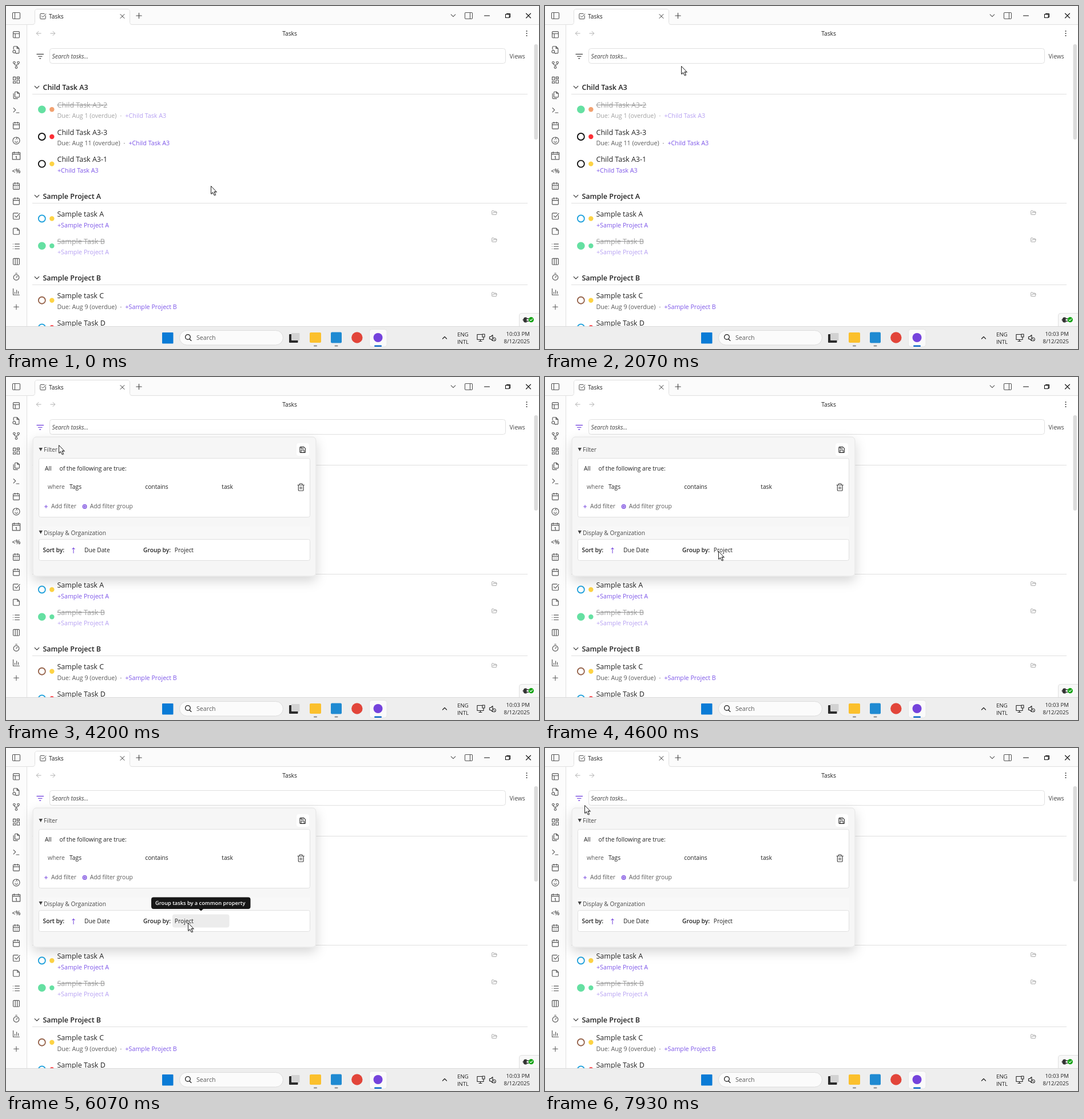
Write an HTML page that moves like this. It is 932x601 px and loops after 8000 ms.

```html
<!DOCTYPE html>
<html lang="en">
<head>
<meta charset="utf-8">
<title>Tasks</title>
<style>
html, body { margin: 0; width: 100%; height: 100%; overflow: hidden; background: #fff; }
svg { display: block; font-family: "Open Sans", "Noto Sans", sans-serif; }
text { white-space: pre; fill: #222; }
.name { font-size: 12.5px; }
.head { font-size: 12.5px; font-weight: 600; }
.meta { font-size: 10.7px; fill: #5c5c5c; }
.link { font-size: 10.7px; fill: #7c55e8; }
.ui { font-size: 10.25px; }
.muted { fill: #5c5c5c; }
.label { fill: #484848; font-weight: 500; }
.semi { font-weight: 600; }
.tip { font-size: 9.25px; font-weight: 600; fill: #fff; }
.tray { font-size: 9.6px; }
.icon { fill: none; stroke: #555; stroke-width: 2; stroke-linecap: round; stroke-linejoin: round; }
.done { opacity: .56; }
.done .name { text-decoration: line-through; fill: #555; }
.line { fill: none; stroke: #e0e0e0; }
</style>
</head>
<body>
<svg id="stage" width="932" height="601" viewBox="0 0 932 601">
  <defs>
    <clipPath id="page"><rect width="932" height="561"/></clipPath>
    <filter id="soft" x="-10%" y="-20%" width="120%" height="150%">
      <feDropShadow dx="0" dy="8" stdDeviation="10" flood-opacity=".16"/>
    </filter>
    <filter id="pointerShade" x="-50%" y="-50%" width="200%" height="200%">
      <feDropShadow dx="1" dy="1" stdDeviation=".7" flood-opacity=".3"/>
    </filter>
  </defs>
  <rect width="932" height="601" fill="#fff"/>
  <g id="chrome"></g>
  <g id="list" clip-path="url(#page)"></g>
  <g id="toolbar"></g>
  <g id="panel"></g>
  <g id="taskbar"></g>
  <g id="tooltip">
    <rect x="254" y="261.5" width="173.500" height="20.500" rx="4" fill="#171717"/>
    <path d="M336.500 281.500h9l-4.500 4z" fill="#171717"/>
    <text x="261" y="275" class="tip">Group tasks by a common property</text>
  </g>
  <g id="pointer" fill="#fff" stroke="#222" stroke-linejoin="round" filter="url(#pointerShade)">
    <path id="arrow" d="M.5.5V14.200l3-2.800 2.400 5.100 2.300-1-2.300-4.900h4.100z"/>
    <path id="hand" d="M-1 1.500a1.600 1.600 0 0 1 3.200 0V6.500l5 1.100q2 .6 2 2.700v3.500l-1.700 5.700H-.3l-4.500-6.300q-.6-1.900 1.200-2.300l2.600 2zM3.700 7v3.200M6.300 7.600v2.800"/>
  </g>
</svg>
<script>
const $ = id => document.getElementById(id);
const text = (x, y, cls, s, extra = '') => `<text x="${x}" y="${y}" class="${cls}" ${extra}>${s}</text>`;
const box = (x, y, w, h, fill, r = 0, extra = '') =>
  `<rect x="${x}" y="${y}" width="${w}" height="${h}" rx="${r}" fill="${fill}" ${extra}/>`;
const disc = (x, y, r, fill, extra = '') => `<circle cx="${x}" cy="${y}" r="${r}" fill="${fill}" ${extra}/>`;
const path = (d, color = '#333', w = 1.1) =>
  `<path d="${d}" class="icon" style="stroke:${color};stroke-width:${w}"/>`;
const border = 'stroke="#e0e0e0"';

// Icons are drawn on a 24-unit grid and centred on x, y.
const shapes = {
  layout: 'M5 3h14q2 0 2 2v14q0 2-2 2H5q-2 0-2-2V5q0-2 2-2zM3 9h18M9 21V9',
  fileSearch: 'M14 2v6h6V20q0 2-2 2H13M4 10V4q0-2 2-2h8l6 6M2 17a4 4 0 1 0 8 0 4 4 0 1 0-8 0M9 20l3 3',
  fork: 'M3 5a3 3 0 1 0 6 0 3 3 0 1 0-6 0M15 5a3 3 0 1 0 6 0 3 3 0 1 0-6 0M9 19a3 3 0 1 0 6 0 3 3 0 1 0-6 0M6 8q0 4 6 4t6-4M12 12v4',
  grid: 'M3 3h7v9H3zM14 3h7v5h-7zM14 12h7v9h-7zM3 16h7v5H3z',
  files: 'M15 2h-5q-2 0-2 2v12q0 2 2 2h9q2 0 2-2V7zV7h6M4 7v13q0 2 2 2h10',
  terminal: 'M4 17l6-6-6-6M12 19h8',
  calendar: 'M5 4h14q2 0 2 2v14q0 2-2 2H5q-2 0-2-2V6q0-2 2-2zM3 10h18M8 2v4M16 2v4',
  face: 'M2 12a10 10 0 1 0 20 0 10 10 0 1 0-20 0M8 15q4 4 8 0M9 10h0M15 10h0M12 2q4 4 0 5',
  day: 'M1 3h22v20H1zM1 8h22M6 1v4M18 1v4',
  dates: 'M5 4h14q2 0 2 2v14q0 2-2 2H5q-2 0-2-2V6q0-2 2-2zM3 10h18M8 2v4M16 2v4M8 14h0M12 14h0M16 14h0M8 18h0M12 18h0M16 18h0',
  check: 'M21 10v9q0 2-2 2H5q-2 0-2-2V5q0-2 2-2h12M8 11l4 4L22 4',
  note: 'M15 3H5q-2 0-2 2v14q0 2 2 2h14q2 0 2-2V9zv6h6',
  list: 'M8 5h13M8 12h13M8 19h13M3 5h0M3 12h0M3 19h0',
  columns: 'M5 3h14q2 0 2 2v14q0 2-2 2H5q-2 0-2-2V5q0-2 2-2zM9 3v18M15 3v18',
  timer: 'M10 2h4M12 14l3-3M4 14a8 8 0 1 0 16 0 8 8 0 1 0-16 0',
  chart: 'M3 3v18h18M8 17v-4M13 17V7M18 17V11',
  plus: 'M4 12h16M12 4v16',
  close: 'M5 5l14 14M19 5L5 19',
  down: 'M5 9l7 7 7-7',
  up: 'M5 15l7-7 7 7',
  back: 'M19 12H4M11 5l-7 7 7 7',
  next: 'M5 12h15M13 5l7 7-7 7',
  folder: 'M6 14l2-4h14l-3 9H4q-2 0-2-2V5q0-2 2-2h4l2 3h8q2 0 2 2v2',
  save: 'M5 3h11l5 5v11q0 2-2 2H5q-2 0-2-2V5q0-2 2-2zM7 3v5h8M7 21v-8h10v8',
  trash: 'M3 6h18M19 6v14q0 2-2 2H7q-2 0-2-2V6M8 6V4q0-2 2-2h4q2 0 2 2v2M10 11v6M14 11v6',
  search: 'M3 10a8 8 0 1 0 16 0 8 8 0 1 0-16 0M16 16l6 6'
};
const icon = (name, x, y, size = 14, color = '#555', w = 1.9) =>
  `<path class="icon" d="${shapes[name]}" transform="translate(${x - size / 2} ${y - size / 2}) scale(${size / 24})" style="stroke:${color};stroke-width:${w}"/>`;
const sidebar = (x, split) =>
  path(`M${x + 2} 11.500h10q1.500 0 1.500 1.500v8q0 1.500-1.500 1.500h-10q-1.500 0-1.500-1.500v-8q0-1.500 1.500-1.500zM${split} 11.500v11`, '#555');

const ribbon = ['layout', 'fileSearch', 'fork', 'grid', 'files', 'terminal', 'calendar', 'face', 'day', '',
  'dates', 'calendar', 'check', 'note', 'list', 'columns', 'timer', 'chart', 'plus'];

$('chrome').innerHTML =
  box(0, 0, 932, 33, '#fbfbfb') + box(0, 33, 36, 528, '#fcfcfc') +
  '<path class="line" d="M0 32.500H46q4.500 0 4.500-4V10q0-4.500 4.500-4.500H212q4.500 0 4.500 4.500V28.500q0 4 4.500 4H932M36.500 33V561"/>' +
  '<path fill="#fff" d="M47 34q4-1 4-6V10q0-4 4-4H212q4 0 4 4V28q0 5 4 6z"/>' +
  sidebar(11, 15.5) + sidebar(802, 811.5) +
  icon('check', 64.5, 18, 12.5, '#444') + text(75, 22, 'ui', 'Tasks') +
  icon('close', 203.5, 18, 12, '#333', 2) + icon('plus', 232.5, 17, 14, '#444') +
  icon('down', 782, 16.5, 13, '#555') +
  path('M836.500 17h9M875.500 14.500v-1h6v6h-1.500M873.500 14.500h6.500v6h-6.500zM909.500 13l8 8M917.500 13l-8 8', '#111') +
  ribbon.map((name, i) => name && icon(name, 18, 50.3 + i * 26.5, name === 'plus' ? 13 : 14.5)).join('') +
  text(18, 267.5, 'ui semi', '1', 'text-anchor="middle" style="font-size:7.5px"') +
  text(18, 292.5, 'ui semi', '&lt;%', 'text-anchor="middle" style="font-size:10.3px;fill:#444"') +
  icon('back', 57.5, 48, 12.5, '#b0b0b0') + icon('next', 81.5, 48, 12.5, '#b0b0b0') +
  text(496, 52, 'ui', 'Tasks', 'text-anchor="middle" font-weight="500"') +
  [44, 48, 52].map(y => disc(910.5, y, 1.1, '#444')).join('') +
  box(923.5, 67, 6.5, 167, '#dcdcdc', 3.2);

const section = (y, title) =>
  icon('down', 54, y, 13, '#333', 2.2) + text(64.5, y + 4.5, 'head', title) +
  `<path class="line" d="M46 ${y + 12.5}H912"/>`;

function task(y, name, color, priority, project, { due, linkX = 90, done, folder } = {}) {
  const ring = done ? disc(62.8, y, 6.8, color) : disc(62.8, y, 6, '#fff', `stroke="${color}" stroke-width="1.9"`);
  const metaY = y + 15;
  const words = text(89.5, y - 3.5, 'name', name) +
    (due ? text(89.5, metaY, 'meta', due) + text(linkX - 9, metaY, 'meta', '·') : '') +
    text(linkX, metaY, 'link', '+' + project);
  return ring + disc(80.3, y, 4.2, priority) + `<g class="${done ? 'done' : ''}">${words}</g>` +
    (folder ? icon('folder', 854, y - 10, 10.5, '#999') : '');
}

const green = '#65e0a2', red = '#fb2f36', yellow = '#fdd344', blue = '#23a3dd';
$('list').innerHTML =
  section(142, 'Child Task A3') +
  task(181.3, 'Child Task A3-2', green, '#f2a170', 'Child Task A3', { due: 'Due: Aug 1 (overdue)', linkX: 208.5, done: true }) +
  task(229, 'Child Task A3-3', '#111', red, 'Child Task A3', { due: 'Due: Aug 11 (overdue)', linkX: 214.5 }) +
  task(276.6, 'Child Task A3-1', '#111', yellow, 'Child Task A3') +
  section(333, 'Sample Project A') +
  task(372.5, 'Sample task A', blue, yellow, 'Sample Project A', { folder: true }) +
  task(420.2, 'Sample Task B', green, green, 'Sample Project A', { done: true, folder: true }) +
  section(476, 'Sample Project B') +
  task(515.7, 'Sample task C', '#96644c', yellow, 'Sample Project B', { due: 'Due: Aug 9 (overdue)', linkX: 208.5, folder: true }) +
  task(563.5, 'Sample Task D', blue, red, 'Sample Project B') +
  '<path d="M897.500 562V543q0-4.500 4.500-4.500H933V562z" fill="#f8f8f8" stroke="#e0e0e0"/>' +
  '<path d="M907 545.500h3.500v9H907q-2.500-1-2.500-4.500t2.500-4.500z" fill="#333"/>' +
  path('M904 550h3M910 547.700h3.500M910 552.300h3.500', '#333', 1.5) + disc(918.3, 549.7, 4.6, '#10a310') +
  path('M916.200 549.800l1.600 1.600 2.800-3.200', '#fff');

$('toolbar').innerHTML =
  '<path id="filter" class="icon" style="stroke-width:1.300" d="M54 84.500h11.500M56.500 88.300h6.500M58.700 92h2"/>' +
  box(76.5, 74.5, 797, 26, '#fff', 4, border) +
  text(80.5, 92, 'ui', 'Search tasks...', 'font-style="italic" style="fill:#444"') +
  text(880.5, 92, 'ui label', 'Views');

$('taskbar').innerHTML =
  box(0, 561, 932, 40, '#eeeeee') + box(0, 561, 932, 1, '#dadada') +
  box(273, 572, 19.5, 19.5, '#0a7bd6', 1) +
  box(303.5, 568.5, 181, 25.5, '#fbfbfb', 12.8, 'stroke="#dcdcdc"') +
  icon('search', 318.5, 581, 13, '#222', 2.4) + text(333, 585, 'ui', 'Search', 'style="font-size:10.7px;fill:#5c5c5c"') +
  box(495, 575, 15.5, 15, '#2b2b2b', 1) + box(499, 573, 14.5, 13, '#d2d2d2', 1) +
  box(531, 572, 20, 18, '#fbc02d', 2) + box(538, 594.5, 6, 2, '#888', 1) +
  box(568, 571.5, 19, 19, '#1f8ad2', 2) + box(574.5, 594.5, 6, 2, '#888', 1) +
  disc(613.8, 581, 9.7, '#e2453a') +
  box(635.5, 566.5, 30.5, 30.5, '#fafafa', 4, 'stroke="#e6e6e6"') +
  disc(650.5, 581, 8, '#7543dc') + box(644, 594.5, 13, 2.5, '#0a66c8', 1.2) +
  icon('up', 767, 581.5, 12, '#222', 2.4) +
  text(799, 579, 'tray', 'ENG', 'text-anchor="middle"') + text(799, 592, 'tray', 'INTL', 'text-anchor="middle"') +
  path('M833 575.500h-9v9h8.500M827 587.500h5M829.500 585v2.500M833 575h4v5h-4zM835 580v4.500h-2', '#222') +
  path('M845.500 579.500h2l3.500-3v10l-3.500-3h-2z', '#222') +
  disc(853.5, 584, 3, '#eee', 'stroke="#222"') + path('M851.500 582l4 4', '#222', 1) +
  text(916, 578, 'tray', '10:03 PM', 'text-anchor="end"') + text(916, 591, 'tray', '8/12/2025', 'text-anchor="end"');

const purple = '#7c4fe0';
const fold = y => `<path d="M57.500 ${y - 3}h6.400l-3.200 6z" fill="#444"/>`;
$('panel').innerHTML =
  box(47, 105, 495, 244, '#f6f6f6', 6, 'stroke="#e2e2e2" filter="url(#soft)"') +
  fold(127) + text(66, 131, 'ui label', 'Filter') +
  box(508, 116, 22, 22, '#fff', 4) + icon('save', 518.7, 127.5, 13, '#222') +
  box(57.5, 142.5, 474, 103, '#fff', 3, border) +
  text(68, 164, 'ui', 'All') + text(93.5, 164, 'ui', 'of the following are true:') +
  text(73, 196.3, 'ui muted', 'where') + text(111, 196.3, 'ui', 'Tags') +
  text(243.3, 196.3, 'ui', 'contains') + text(377.3, 196.3, 'ui', 'task') +
  icon('trash', 515.7, 193, 15, '#444') +
  box(131.5, 214, 93, 24, '#ededed', 3, 'id="groupHover"') +
  path('M67.500 227h5M70 224.500v5', purple) + text(79, 230.3, 'ui muted', 'Add filter') +
  disc(137.6, 227, 3.3, '#e4daf8', `stroke="${purple}" stroke-width="1.3"`) +
  path('M135.500 227h4.200M137.600 225v4', purple) +
  text(146.8, 230.3, 'ui muted', 'Add filter group', 'id="groupLabel"') +
  box(57, 262, 475, 22, '#f8f8f8') + fold(272) +
  text(66, 276.5, 'ui label', 'Display &amp; Organization') +
  box(57.5, 284.5, 474, 37, '#fff', 3, border) +
  text(64.5, 307.3, 'ui semi', 'Sort by:') +
  path('M118 308.500v-9M116 301.500l2-2.200 2 2.200', purple) +
  text(137, 307.3, 'ui', 'Due Date') + text(240, 307.3, 'ui semi', 'Group by:') +
  box(291, 291.5, 99.5, 23, '#ececec', 4, 'id="selectHover"') +
  text(294.8, 307.3, 'ui', 'Project');

// Pointer route: time, x, y.
const route = [
  [0, 358, 315], [1400, 358, 315], [1600, 350, 298], [1867, 290, 170], [2067, 238, 105], [2267, 157, 93],
  [2333, 140, 94], [2533, 100, 94], [2800, 75, 91], [3067, 62, 88], [3333, 62, 89], [4133, 62, 89],
  [4400, 180, 210], [4600, 303, 305], [4733, 311, 307], [4867, 308, 304], [5133, 308, 304], [5267, 317, 305],
  [6067, 318, 306], [6267, 346, 307], [6600, 346, 307], [6733, 318, 313], [6867, 235, 265], [6933, 190, 226],
  [7067, 109, 113], [7200, 65, 50], [7333, 40, 15], [7467, 43, 24], [7533, 47, 36], [7733, 72, 112],
  [7800, 72, 112], [7933, 69, 100], [8000, 69, 100]
];
const STEP = 200 / 3, LOOP = 8000;

function locate(t) {
  const i = route.findIndex((p, n) => n && t <= p[0]);
  const [t0, x0, y0] = route[i - 1], [t1, x1, y1] = route[i];
  const k = (t - t0) / (t1 - t0);
  return [Math.round(x0 + (x1 - x0) * k), Math.round(y0 + (y1 - y0) * k)];
}

const show = (id, on) => { $(id).style.display = on ? '' : 'none'; };

function draw() {
  const now = performance.now() % LOOP;
  // Steps begin on times rounded to 10 ms, up to 4 ms early.
  const t = Math.floor((now + 4) / STEP) * STEP % LOOP;
  const within = (from, to) => t >= from - 10 && t < to - 10;
  const [x, y] = locate(t);
  $('pointer').setAttribute('transform', `translate(${x} ${y})`);
  const hand = within(3333, 4200), overGroup = within(6933, 7133), open = t >= 3390;
  show('hand', hand);
  show('arrow', !hand);
  show('panel', open);
  show('selectHover', within(4667, 6800));
  show('tooltip', within(5467, 6800));
  show('groupHover', overGroup);
  $('groupLabel').style.fill = overGroup ? '#222' : '';
  $('filter').style.stroke = open ? purple : '#555';
  requestAnimationFrame(draw);
}
draw();
</script>
</body>
</html>
```
